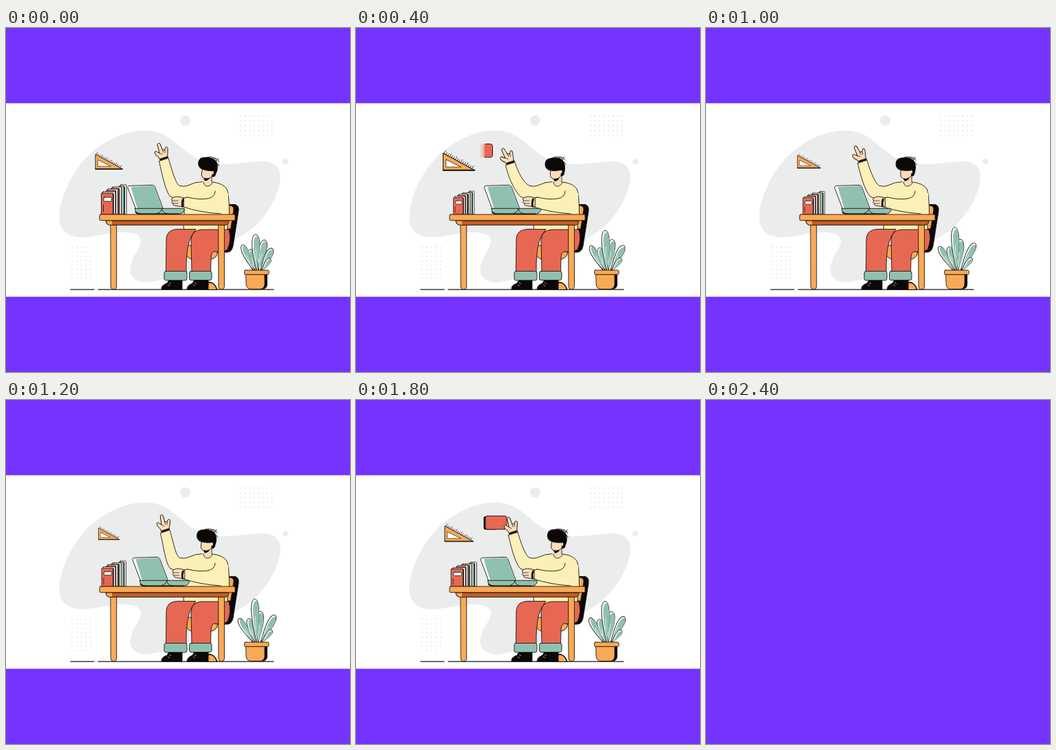
These frames come from a looping animation (500x500 px, 2.6 s). An HTML page:

```html
<!DOCTYPE html>
<html lang="en">
<head>
<meta charset="utf-8">
<title>Desk lesson</title>
<style>
  html, body { margin: 0; width: 100%; height: 100%; overflow: hidden; background: #7433ff; }
  svg { display: block; width: 100vw; height: 100vh; stroke-width: .9; }
  .o { stroke: #1b1512; stroke-linejoin: round; stroke-linecap: round; }
  .n { fill: none; }
  .k { fill: #0b0808; }
  .orange { fill: #f9aa55; }
  .red { fill: #e66853; }
  .teal { fill: #8fc0b0; }
  .cream { fill: #fbf0b7; }
  .skin { fill: #fcdcb8; }
  .white { fill: #fff; }
  .grey { fill: #ebecec; }
</style>
</head>
<body>
<svg viewBox="0 0 500 500">
  <defs>
    <linearGradient id="fade">
      <stop offset="0" stop-color="#e66853" stop-opacity="0"/>
      <stop offset=".5" stop-color="#e66853" stop-opacity=".35"/>
      <stop offset="1" stop-color="#e66853"/>
    </linearGradient>
  </defs>
  <g id="scene">
    <rect class="white" y="109.4" width="500" height="281.2"/>
    <path class="grey" d="M203 149C238 149 250 175 278 190C311 206 345 193 376 194C396 196 401 208 398 226C391 255 372 285 341 303C320 315 319 327 297 340C268 356 237 365 207 369.500C188 371 178 360 181 347C184 329 196 321 196 309C195 298 180 297 166 297C143 298 128 305 108 304C86 303 76 290 77.500 271C80 241 98 206 122 183C146 162 174 149 203 149Z"/>
    <circle class="grey" cx="260.500" cy="134.500" r="7.500"/>
    <circle class="grey" cx="406" cy="194" r="4"/>
    <g id="dots" fill="#e2e3e3"></g>
    <path class="o n" stroke-width="1.2" d="M94 380.200H128M134 380.200H389"/>

    <g id="square">
      <path class="o n" id="ticks" stroke-width=".7"/>
      <path class="o orange" d="M-19.500-11V10H19.500Z"/>
      <path class="o white" stroke-width=".6" d="M-16-3V6H2.500Z"/>
      <path class="o n" stroke-width="1.5" d="M-19.500 10H19.500"/>
    </g>

    <g id="plant"></g>
    <path class="o k" d="M368 358H379.500V373Q379 379.500 372 379.500H362Z"/>
    <path class="o orange" d="M349 358H376V373Q375 379.500 369 379.500H356Q349 379 349 372Z"/>
    <rect class="o orange" x="346.500" y="352" width="35.500" height="6.300" rx="1.500"/>

    <path class="o k" d="M322 256.500H333Q339 258 338 266L330 317Q328 326 321 326H306V320H316Z"/>
    <path class="o orange" d="M322 258Q331.500 257 331 264L326.500 292H321Z"/>
    <path class="o orange" d="M261 316H307V329Q304 336 296 336H270Q262 334 261 326Z"/>
    <path class="o k" d="M282 380Q284 369 294 369Q304 369 307 380Z"/>
    <path class="o orange" d="M292 380Q292 370 296 370Q304 371 306 380Z"/>

    <path class="o cream" d="M258 280H322V296H259Z"/>
    <path class="o red" d="M232.500 355L233 306Q234 293 249 292.500H276Q269 301 266 311Q261.500 328 262 355Z"/>
    <path class="o red" d="M270 355L269 308Q270 294 284 293H324Q328 308 322 322Q315 326 302 325Q298 327 298 334L297.500 355Z"/>
    <path class="o k" d="M226 380Q225 374 234 371L237 366H256V380ZM263 380Q263 374 271 371L274 366H294V380Z"/>
    <path d="M235 373l3 2M237 370l3 2M272 373l3 2M274 370l3 2" stroke="#fff" stroke-width=".6"/>
    <rect class="o teal" x="230" y="353.500" width="33" height="13.300" rx="2.500"/>
    <rect class="o teal" x="266.500" y="353.500" width="32.500" height="13" rx="2.500"/>

    <g id="card">
      <rect class="k" id="side" rx="3" height="19.500" y="169"/>
      <rect class="o red" id="face" rx="3" height="19.500" y="168.500"/>
    </g>
    <g id="reveal">
      <rect fill="url(#fade)" x="179" y="168.500" width="11" height="19.500"/>
      <path class="red" d="M187 168.500H195Q198.500 168.500 198.500 172V185Q198.500 188 195 188H187Z"/>
      <path class="o n" d="M188 168.500H195Q198.500 168.500 198.500 172V185Q198.500 188 195 188H187"/>
    </g>

    <path class="cream" d="M250 240L263 230Q274 223 285 223H301Q316 225 321 233Q324.500 240 324.500 271H259V248Z"/>
    <path class="o n" d="M301 224Q316 226 321 234Q324.500 241 324.500 271M259 262V271"/>
    <g id="hand">
      <path class="o skin" d="M-5 2L-6-4Q-10.500-9-9.500-12.500Q-8-15.500-6-12.500L-3-9.500L-2.300-22Q0-25.500 2-22L2.500-12Q4-14 5.500-11.500L7.500-14.500Q10.500-16.500 10.500-12.500L7.500-4L5 2Z"/>
      <path class="o n" stroke-width=".7" d="M-3-9.500L0-6.500M2.500-12V-8.500M5.500-11.500L5-8"/>
    </g>
    <path class="o n" id="cuff" stroke-width="3"/>
    <path class="cream" id="sleeve"/>
    <path class="o n" id="seam"/>

    <path class="skin" d="M287 215V226Q292 232 299 225V213Z"/>
    <path class="o n" d="M287 224Q288 230 292.500 230Q298.500 229.500 300.500 224M299 214V224"/>
    <g id="head">
      <path class="o skin" d="M282.500 205V214.500Q283.500 219.500 289 219.500Q296 219.500 298.500 213L299 205Z"/>
      <path class="k" d="M286.500 219.300Q291 220 295.500 217.500Q294 222 289 223Z"/>
      <path class="k" d="M274.500 198Q274.500 190 283 189Q294 186.500 300 191.500Q304.500 197 304 205L302.500 213Q300 216.500 298 214.500L296.500 207Q286 209 279.500 206.500Q274.500 203.500 274.500 198Z"/>
      <ellipse class="skin" cx="298" cy="209" rx="1.500" ry="2.500"/>
      <path class="o n" stroke-width=".8" d="M285 189Q293 184.500 301 190.500M294 188Q301 186 304 192M300 192L302.500 187M301 194Q304 194.500 305 198"/>
    </g>

    <path class="cream" d="M304 237Q304 246 293 248Q280 250 264 246L256 247L258 260Q281 268 312 271H323V240Z"/>
    <path class="o n" d="M304 237Q304 246 293 248Q280 250 264 246L257 247.500M258 260Q281 268 312 270"/>
    <g id="rest">
      <path class="o skin" d="M258 247Q247 243 242 247Q239 249 242 251Q239 254 243 255Q242 258 247 258.500L258 260Z"/>
      <path class="o n" stroke-width=".7" d="M242 251H250M243 255H250"/>
    </g>
    <path class="o n" stroke-width="2.800" d="M257.500 249Q255.500 253 256.500 259"/>

    <g id="books"></g>
    <g id="laptop">
      <path class="o white" d="M177 232Q176.500 229.500 180 229.300L212 228.300Q215 228 216.500 231L228.500 263H189Z"/>
      <path class="teal" d="M182 233Q181.500 231 184 230.700L212 229.300Q215 229 216 232L227.500 262.500H191Z"/>
      <path class="o teal" d="M187.500 262.300H258Q260 262.500 259 265Q257 270.300 251 270.300H196Q187 270 187.500 262.300Z"/>
      <path class="o n" stroke-width="1.800" d="M188.500 267.500Q190 270.300 197 270.300H251"/>
      <path class="o n" d="M228 262.500Q224 269 219 270M226 263Q229 270 235 270"/>
    </g>

    <path class="o" fill="#c45d20" d="M145 280H324Q324 286.500 318 286.500H151Q145 286 145 280Z"/>
    <path class="orange" d="M146 280.500H154V286H151Q147 285 146 280.500Z"/>
    <path class="o orange" d="M152.300 286.500H160.700V376.500Q160 380 156.500 380Q153 380 152.300 376.500ZM309 286.500H317.400V376.500Q316.700 380 313.200 380Q309.700 380 309 376.500Z"/>
    <rect class="o orange" x="136" y="271" width="197" height="8.700" rx="1.500"/>
  </g>
</svg>
<script>
  const $ = id => document.getElementById(id);
  const set = (id, attrs) => {
    for (const name in attrs) $(id).setAttribute(name, attrs[name]);
  };
  const STEP = 200, LOOP = 2600, END = 2400, LAST = 10;

  // One value per 400 ms
  const keys = {
    laptop: [0, 9.5, 12, 7, 2, 7],
    bookX: [1, .83, .78, .97, 1.02, 1.02],
    bookY: [1, .79, .71, .86, .88, .76],
    wristX: [229, 224, 223, 231, 231, 225],
    wristY: [190, 196, 196, 190, 190, 196],
    hand: [-18, -28, -38, -12, -12, -21],
    head: [11, 0, 0, 6, 11, 4],
    spread: [0, .6, .95, 1.1, .95, .6]
  };
  // One value per 200 ms
  const squareWidth = [40, 44, 47, 52, 49, 34, 31, 36, 39, 42, 43];
  const cardState = [0, 0, 1, 2, 3, 0, 0, 0, 1, 2, 2];

  function sample(list, pos) {
    const i = Math.floor(pos), f = pos - i;
    const at = n => list[Math.max(0, Math.min(list.length - 1, n))];
    if (!f) return at(i);
    const [a, b, c, d] = [at(i - 1), at(i), at(i + 1), at(i + 2)];
    return b + f * (c - a + f * (2 * a - 5 * b + 4 * c - d + f * (3 * (b - c) + d - a))) / 2;
  }

  function dotGrid(x, y, cols, rows, dx, dy) {
    let out = '';
    for (let r = 0; r < rows; r++)
      for (let c = 0; c < cols; c++)
        out += `<circle cx="${x + c * dx}" cy="${y + r * dy}" r=".9"/>`;
    return out;
  }

  function book(x, top, w, fill, label) {
    return `<rect class="o white" x="${x + 2}" y="${top - 2}" width="${w}" height="${-top + 2}" rx="1"/>
      <rect class="o ${fill}" x="${x}" y="${top}" width="${w - 1}" height="${-top}" rx="1"/>
      <path class="o n" stroke-width="1.6" d="M${x + w - 1} ${top + 1}V0"/>` +
      (label ? `<rect class="o white" x="${x + 3.5}" y="${top + 6}" width="${w - 7}" height="6" rx="1.5"/>
      <path class="o n" d="M${x + 3} ${top + 17}V-4"/>` : '');
  }

  // angle, swing, length, growth, half width
  const leaves = [
    [12, -7, 46, 0, 5.5], [-12, -2, 32, 4, 4.5], [-1, -1, 53, 10, 5.5],
    [28, 0, 37, 8, 5], [-23, -7, 41, 0, 4.5], [36, 3, 22, 2, 3.5]
  ];

  function plant(s) {
    return leaves.map(([angle, swing, len, grow, w]) => {
      const l = len + grow * s;
      const shape = `M0 0C${-w * .4} ${-l * .3} ${-w} ${-l * .45} ${-w} ${-l * .75}` +
        `C${-w} ${-l * 1.08} ${w} ${-l * 1.08} ${w} ${-l * .75}C${w} ${-l * .45} ${w * .4} ${-l * .3} 0 0Z`;
      return `<g transform="translate(${364 + angle * .2} 353) rotate(${angle + swing * s})">
        <path class="o white" d="${shape}"/>
        <path class="teal" transform="translate(1.2 0) scale(.78 .95)" d="${shape}"/>
        <path d="M0 ${-l * .3}V${-l * .6}" stroke="#fff" stroke-width=".6"/></g>`;
    }).join('');
  }

  function arm(x, y, angle) {
    set('hand', { transform: `translate(${x} ${y}) rotate(${angle})` });
    const lx = x - 6.5, ly = y + 3.5, rx = x + 7, ry = y - 1;
    const outer = `M${lx} ${ly}C${lx + 5} ${ly + 22} 232 238 239 245Q249 251 264 246`;
    const inner = `C${rx + 6} ${ry + 20} 247 228 253 229.500Q258 231 264 229Q275 223.500 285 223.500`;
    set('sleeve', { d: `${outer}L285 240V223.500Q275 223.500 264 229Q258 231 253 229.500C247 228 ${rx + 6} ${ry + 20} ${rx} ${ry}Z` });
    set('seam', { d: `${outer}M${lx} ${ly}L${rx} ${ry}${inner}` });
    set('cuff', { d: `M${x - 4} ${y + 1}L${x + 5.5} ${y - 2}` });
  }

  function card(state) {
    $('reveal').style.display = state === 1 ? '' : 'none';
    $('card').style.display = state > 1 ? '' : 'none';
    const tilted = state === 3;
    set('side', { x: tilted ? 191.5 : 185.5, width: 20 });
    set('face', { x: tilted ? 195 : 188, width: tilted ? 28 : 31 });
    set('card', { transform: tilted ? 'rotate(-2 207 178)' : '' });
  }

  function draw(step) {
    const p = {};
    for (const name in keys) p[name] = sample(keys[name], step / 2);
    set('laptop', { transform: `translate(${p.laptop} 0)` });
    set('rest', { transform: `translate(${p.laptop * .2} 0)` });
    set('books', { transform: `translate(156.500 271) scale(${p.bookX} ${p.bookY})` });
    set('square', { transform: `translate(149.500 195) scale(${squareWidth[step] / 40})` });
    set('head', { transform: `rotate(${p.head} 293 222)` });
    $('plant').innerHTML = plant(p.spread);
    arm(p.wristX, p.wristY, p.hand);
    card(cardState[step]);
  }

  $('dots').innerHTML = dotGrid(341, 128, 8, 5, 6.5, 7) + dotGrid(96, 319, 5, 8, 6.7, 6.4);
  $('books').innerHTML = book(7.5, -41, 9, 'teal') + book(-4, -38, 13, 'red') +
    book(-11, -35, 15, 'red') + book(-18, -31, 18.5, 'red', true);
  set('ticks', {
    d: Array.from({ length: 16 }, (_, i) =>
      `M${-18.5 + i * 2.3} ${-10.5 + i * 1.24}l${i % 3 ? 1.5 : 2.3} ${i % 3 ? -2.4 : -3.6}`).join('')
  });

  let shown = -1;
  function tick() {
    const t = performance.now() % LOOP;
    $('scene').style.display = t < END ? '' : 'none';
    const step = Math.min(LAST, Math.floor(t / STEP));
    if (step !== shown) draw(shown = step);
    requestAnimationFrame(tick);
  }
  tick();
</script>
</body>
</html>
```
